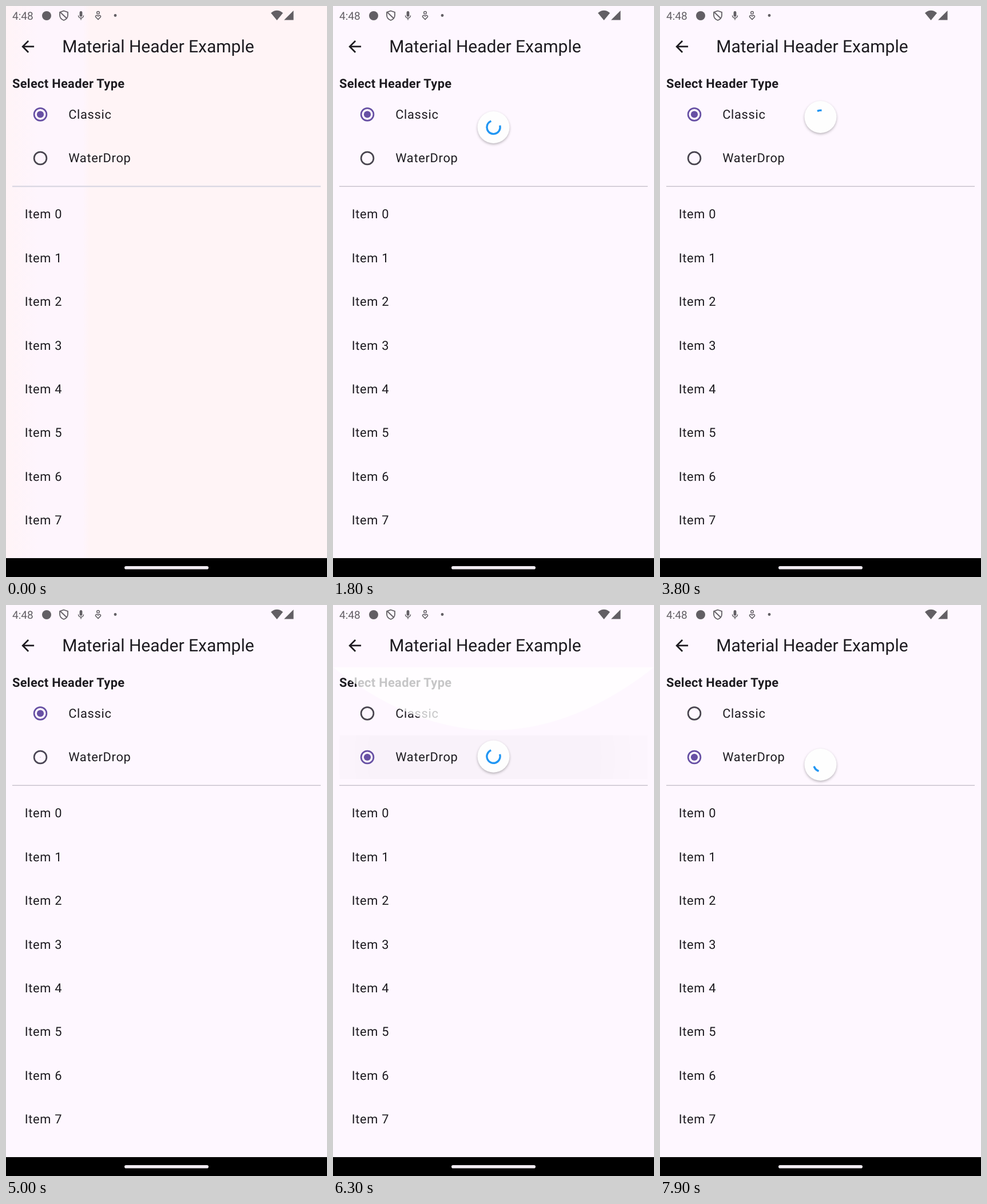
An HTML page that plays this animation: 561 px wide and 998 px high, repeating every 8 s.

```html
<!DOCTYPE html>
<html lang="en">
<head>
<meta charset="utf-8">
<title>Material Header Example</title>
<style>
  html, body { margin: 0; width: 100%; height: 100%; overflow: hidden; background: #fef7ff; }
  svg { display: block; width: 561px; height: 998px; }
  text { font-family: Roboto, sans-serif; font-size: 21.82px; fill: #1d1b20; text-rendering: geometricPrecision; }
  .tile { letter-spacing: .68px; }
  .heading { font-weight: 700; letter-spacing: .34px; }
  .title { font-size: 30px; }
  .clock { font-size: 19.1px; fill: #625f64; }
  .status { fill: #625f64; }
  .line { fill: none; stroke: #625f64; stroke-width: 1.8; }
  .bubble { fill: #fefefe; filter: drop-shadow(0 2px 2px rgba(0, 0, 0, .27)); }
</style>
</head>
<body>
<svg viewBox="0 0 561 998">
  <defs>
    <clipPath id="body"><rect y="109" width="561" height="856"/></clipPath>
    <linearGradient id="warm">
      <stop offset="0" stop-color="#fff4f7"/>
      <stop offset=".1" stop-color="#fef5fd"/>
      <stop offset=".24" stop-color="#fef5fd"/>
      <stop offset=".26" stop-color="#fff4f6"/>
    </linearGradient>
    <radialGradient id="splash" gradientUnits="userSpaceOnUse" cx="265" cy="266" r="100">
      <stop offset="0" stop-color="#1d1b20" stop-opacity=".07"/>
      <stop offset=".72" stop-color="#1d1b20" stop-opacity=".07"/>
      <stop offset="1" stop-color="#1d1b20" stop-opacity="0"/>
    </radialGradient>
  </defs>

  <rect width="561" height="998" fill="#fef7ff"/>
  <rect id="tint" width="561" height="998" fill="url(#warm)"/>

  <text class="clock" x="11" y="24">4:48</text>
  <circle class="status" cx="71" cy="17" r="8"/>
  <g class="line">
    <path d="M101 8.5L108 11V16C108 20.5 105 23.5 101 25C97 23.500 94 20.500 94 16V11ZM95.500 11.500L106 21.500"/>
    <path d="M126.500 16.500a4.500 4.500 0 0 0 9 0M131 21v3.500" stroke-width="1.5"/>
    <circle cx="161" cy="11.800" r="2.300" stroke-width="1.5"/>
    <path d="M161 23.500L156.800 19.300C155.500 17 158.500 15 161 17.800C163.500 15 166.500 17 165.200 19.300Z" stroke-width="1.6"/>
  </g>
  <rect class="status" x="128.600" y="9" width="4.800" height="10" rx="2.400"/>
  <circle class="status" cx="191" cy="16.500" r="2.400"/>
  <path class="status" d="M473.500 25L463 12.200Q473.500 3.500 484 12.200ZM486 24.500L502.500 8V24.500Z"/>

  <path transform="translate(21.8 54.600) scale(1.364)" fill="#1d1b20"
    d="M20 11H7.830l5.590-5.590L12 4l-8 8 8 8 1.410-1.410L7.830 13H20z"/>
  <text class="title" x="98.200" y="81">Material Header Example</text>

  <g id="page">
    <text class="heading" x="10.900" y="143.300">Select Header Type</text>
    <g id="ripple">
      <rect x="11" y="227.700" width="539" height="76.400" fill="#1d1b20" opacity=".05"/>
      <rect x="11" y="227.700" width="539" height="76.400" fill="url(#splash)"/>
    </g>
    <text class="tile" x="109.200" y="196.500">Classic</text>
    <text class="tile" x="109.200" y="273">WaterDrop</text>
    <rect id="divider" x="11" y="314.600" width="539" height="1.400"/>
  </g>

  <g clip-path="url(#body)">
    <path id="wave" fill="#fff" opacity=".75"/>
    <g id="header">
      <circle class="bubble" r="28"/>
      <g id="icon">
        <path id="arc" fill="none" stroke="#2196f3" stroke-width="3.400"/>
        <path id="head" fill="#2196f3"/>
      </g>
    </g>
  </g>

  <rect y="965" width="561" height="33" fill="#000"/>
  <rect x="207" y="979" width="147" height="5.600" rx="2.800" fill="#f1ecf3"/>
</svg>
<script>
const LOOP = 8000, STEP = 100, TOP = 109, CX = 280.5, R = 11.6, STROKE = 3.4;
const $ = id => document.getElementById(id);
const clamp = v => Math.min(1, Math.max(0, v));
const ramp = (t, a, b) => clamp((t - a) / (b - a));
const set = (el, attrs) => { for (const k in attrs) el.setAttribute(k, attrs[k]); };

function add(parent, tag, attrs, text) {
  const el = document.createElementNS('http://www.w3.org/2000/svg', tag);
  set(el, attrs);
  if (text) el.textContent = text;
  return parent.appendChild(el);
}

function track(keys, t) {
  if (t <= keys[0][0]) return keys[0][1];
  for (let i = 1; i < keys.length; i++) {
    const [a, va] = keys[i - 1], [b, vb] = keys[i];
    if (t <= b) return va + (vb - va) * (t - a) / (b - a);
  }
  return keys[keys.length - 1][1];
}

// cubic-bezier(.4, 0, .2, 1)
function ease(x) {
  let lo = 0, hi = 1, s = .5;
  for (let i = 0; i < 24; i++) {
    s = (lo + hi) / 2;
    const bx = 1.2 * s * (1 - s) ** 2 + .6 * s * s * (1 - s) + s ** 3;
    if (bx < x) lo = s; else hi = s;
  }
  return s * s * (3 - 2 * s);
}

for (let i = 0; i < 8; i++)
  add($('page'), 'text', { class: 'tile', x: 32.7, y: 371.3 + i * 76.4 }, 'Item ' + i);

const radios = [189.5, 266].map(cy => ({
  ring: add($('page'), 'circle', { cx: 60, cy, r: 10.9, fill: 'none', 'stroke-width': 2.73 }),
  dot: add($('page'), 'circle', { cx: 60, cy })
}));

function drawRadio({ ring, dot }, on) {
  const mix = (a, b) => Math.round(a + (b - a) * on);
  const color = `rgb(${mix(73, 103)},${mix(69, 80)},${mix(79, 164)})`;
  set(ring, { stroke: color });
  set(dot, { fill: color, r: 6.1 * on });
}

const pulls = [
  { start: 1300, release: 1692, shrink: 3850, end: 4300, wave: false,
    y: [[1300, 96], [1400, 132], [1500, 185], [1600, 240], [1700, 264], [1800, 212],
        [1900, 199], [2000, 195], [2100, 194]] },
  { start: 5700, release: 6196, shrink: 9000, end: 9500, wave: true,
    y: [[5700, 104], [5800, 136], [5900, 168], [6000, 207], [6100, 244], [6200, 262],
        [6500, 270], [6700, 273], [6800, 279]] }
];

function drawArc(time, turn, cap) {
  const phase = time / 1333 % 1;
  const grow = ease(clamp(phase * 2)), trail = ease(clamp(phase * 2 - 1));
  const from = Math.PI * (-.5 + 1.5 * trail + 2 * (time / 2222 % 1) + .5 * phase + turn);
  const sweep = Math.max(1.5 * Math.PI * (grow - trail), .01);
  const to = from + sweep;
  const at = (a, r = R) => [r * Math.cos(a), r * Math.sin(a)];
  set($('arc'), {
    d: `M${at(from)}A${R} ${R} 0 ${sweep > Math.PI ? 1 : 0} 1 ${at(to)}`,
    'stroke-linecap': cap
  });
  return { to, at };
}

function drawHeader(t) {
  const pull = pulls.find(p => t >= p.start && t < p.end);
  $('header').style.display = pull ? '' : 'none';
  $('wave').style.display = pull && pull.wave ? '' : 'none';
  if (!pull) return;

  const y = track(pull.y, t);
  const busy = t >= pull.release;
  const drag = clamp((y - 82) / 67);
  const scale = busy ? 1 - ramp(t, pull.shrink, pull.end) : .9 + .1 * ramp(y, 109, 163);
  set($('header'), { transform: `translate(${CX} ${y}) scale(${scale})` });

  if (pull.wave) {
    const dip = 2 * (y - TOP) * (busy ? 1 - ramp(t, pull.release, 6550) : 1);
    set($('wave'), { d: `M0 ${TOP}Q${CX} ${TOP + Math.max(0, dip)} 561 ${TOP}Z` });
  }

  if (busy) {
    drawArc(666.5 + t - pull.release, 1.35, 'square');
    set($('icon'), { opacity: 1 });
    set($('head'), { d: '' });
  } else {
    const turn = drag < .33 ? -.1 - drag * .3 : -.2 + 1.55 * (drag - .33) / .67;
    const open = ramp(drag, .1, .33);
    const { to, at } = drawArc(666.5 * open, turn, 'butt');
    const size = 1.5 * STROKE * open, [x, v] = at(to);
    const tip = [x - Math.sin(to) * size, v + Math.cos(to) * size];
    set($('head'), { d: `M${at(to, R - size)}L${at(to, R + size)}L${tip}Z` });
    set($('icon'), { opacity: track([[96, .1], [136, .35], [200, 1]], y) });
  }
}

function draw(t) {
  set($('tint'), { opacity: 1 - ramp(t, 0, 900) });
  set($('divider'), t < 1000
    ? { fill: '#d8d6e2', y: 314.2, height: 2.2 }
    : { fill: '#c6c0cb', y: 314.6, height: 1.4 });

  const pick = ramp(t, 4985, 5200);
  drawRadio(radios[0], 1 - ramp(t, 5000, 5200));
  drawRadio(radios[1], pick);

  set($('ripple'), { opacity: ramp(t, 5000, 5150) * (1 - ramp(t, 5800, 6400)) });
  set($('splash'), { r: 20 + 255 * ramp(t, 5000, 5800) });
  drawHeader(t);
}

const begin = performance.now();
function tick() {
  const t = (performance.now() - begin) % LOOP;
  draw(Math.floor(t / STEP) * STEP);
  requestAnimationFrame(tick);
}
tick();
</script>
</body>
</html>
```
